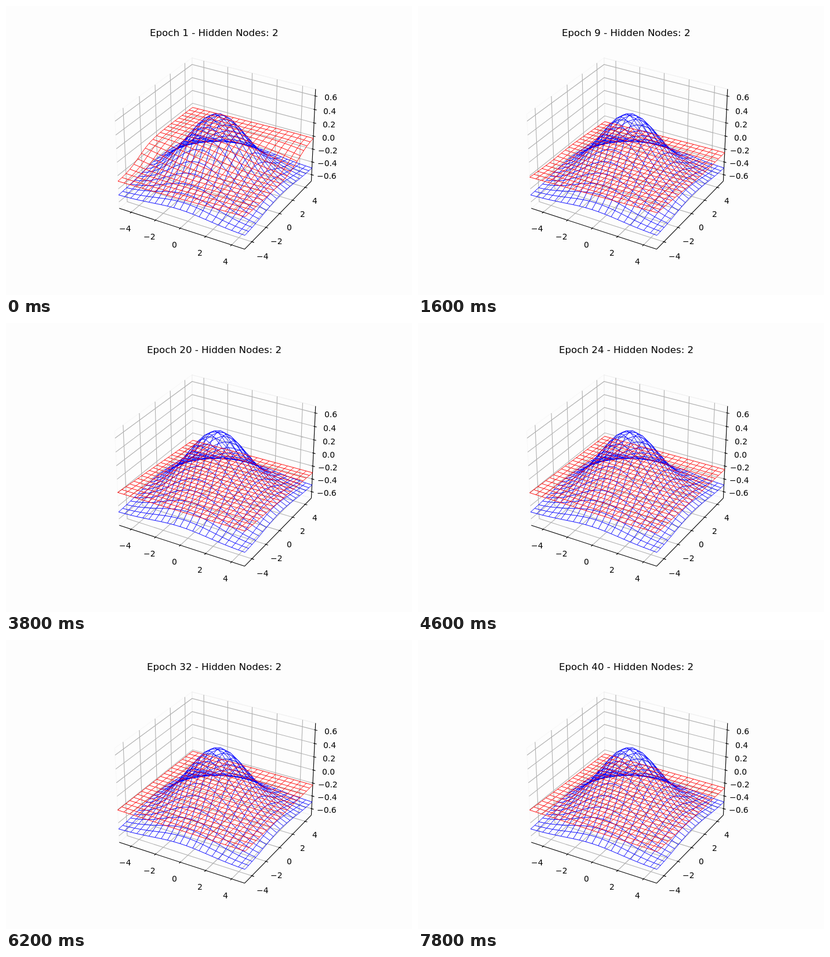
Recreate the animation shown at these times as an HTML page. Size 700 by 500 pixels, loop 8 s.

```html
<!DOCTYPE html>
<html lang="en">
<head>
<meta charset="utf-8">
<title>Surface fit</title>
<style>
  html, body { margin: 0; width: 100%; height: 100%; overflow: hidden; background: #fdfdfd; }
  svg { display: block; width: 700px; height: 500px; }
  path { fill: none; }
  text { font: 13.89px "DejaVu Sans", sans-serif; fill: #000; }
  #title { font-size: 16.67px; }
</style>
</head>
<body>
<svg id="stage" viewBox="0 0 700 500"><text id="title" y="52"></text></svg>
<script>
const stage = document.getElementById('stage');
const title = document.getElementById('title');
const EPOCH_MS = 200, EPOCHS = 40;

// Half sizes of the plot box in world units, and in data units.
const HX = 25 / 42, HZ = 25 / 56, XLIM = 5, ZLIM = 0.7;
const DX = HX * 0.16, DZ = HZ * 0.16;
const WIRE = 0.95;

// Perspective camera: elevation 30, azimuth -60, distance 10.
function project(x, y, z) {
  const r = Math.sqrt(3) / 2;
  const depth = 10 - (r / 2 * x - 0.75 * y + 0.5 * z);
  const scale = 385 / 0.185 / depth;
  return [363.95 + scale * (r * x + 0.5 * y),
          247.3 - scale * (-0.25 * x + r / 2 * y + r * z)];
}
const world = (x, y, z) => [x * HX / XLIM, y * HX / XLIM, z * HZ / ZLIM];
const line = points =>
  'M' + points.map(p => project(...p).map(v => v.toFixed(2)).join(' ')).join('L');

function add(tag, attrs, content = '') {
  const el = document.createElementNS('http://www.w3.org/2000/svg', tag);
  for (const key in attrs) el.setAttribute(key, attrs[key]);
  el.textContent = content;
  stage.append(el);
  return el;
}
const stroke = (d, color, width) => add('path', { d, stroke: color, 'stroke-width': width });

// Centre text on x, starting on a whole pixel.
function centre(text, x) {
  text.setAttribute('x', Math.round(x - text.getComputedTextLength() / 2));
}

function label(value, digits, position) {
  const [x, y] = project(...position);
  centre(add('text', { y: Math.round(y + 11) },
             value.toFixed(digits).replace('-', '\u2212')), x);
}

function drawAxes() {
  const pane = (points, color) => stroke(line(points) + 'Z', color, 1.39);
  pane([[-HX, -HX, -HZ], [-HX, HX, -HZ], [-HX, HX, HZ], [-HX, -HX, HZ]], '#f8f8f8');
  pane([[-HX, HX, -HZ], [HX, HX, -HZ], [HX, HX, HZ], [-HX, HX, HZ]], '#f1f1f1');
  pane([[-HX, -HX, -HZ], [HX, -HX, -HZ], [HX, HX, -HZ], [-HX, HX, -HZ]], '#f5f5f5');

  let grid = '', ticks = '';
  const padX = HX + DX * 0.9957, padZ = HZ + DZ * 0.9957;
  const out = HX + DX * 0.2, inn = HX - DX * 0.1;
  for (let v = -4; v <= 4; v += 2) {
    const w = v * HX / XLIM;
    grid += line([[w, -HX, -HZ], [w, HX, -HZ], [w, HX, HZ]]);
    grid += line([[HX, w, -HZ], [-HX, w, -HZ], [-HX, w, HZ]]);
    ticks += line([[w, -out, -HZ], [w, -inn, -HZ]]);
    ticks += line([[out, w, -HZ], [inn, w, -HZ]]);
    label(v, 0, [w, -padX, -padZ]);
    label(v, 0, [padX, w, -padZ]);
  }
  for (let i = -3; i <= 3; i++) {
    const w = i * 0.2 * HZ / ZLIM;
    grid += line([[-HX, -HX, w], [-HX, HX, w], [HX, HX, w]]);
    ticks += line([[out, HX, w], [inn, HX, w]]);
    label(i * 0.2, 1, [padX, padX, w]);
  }
  stroke(grid, '#b0b0b0', 1.11);
  const edges = line([[-HX, -HX, -HZ], [HX, -HX, -HZ]]) +
                line([[HX, -HX, -HZ], [HX, HX, -HZ]]) +
                line([[HX, HX, -HZ], [HX, HX, HZ]]);
  stroke(edges + ticks, '#000', 1.11);
}

const steps = Array.from({ length: 21 }, (_, i) => -5 + i / 2);
function wireframe(height) {
  return steps.map(a =>
    line(steps.map(b => world(b, a, height(b, a)))) +
    line(steps.map(b => world(a, b, height(a, b))))).join('');
}

// Fitted surface: epoch, heights at left, front, back and right corners,
// then the size and offset of the sigmoid bend.
const KEYS = [
  [1, -0.283, -0.219, -0.066, -0.035, 0.26, 0.2],
  [5, -0.256, -0.190, -0.181, -0.141, 0.12, 1.2],
  [13, -0.196, -0.144, -0.371, -0.342, 0.01, 1.2],
  [20, -0.197, -0.181, -0.319, -0.302, 0, 1.2],
  [24, -0.202, -0.211, -0.255, -0.253, 0, 1.2],
  [32, -0.206, -0.226, -0.222, -0.230, 0, 1.2],
  [40, -0.206, -0.232, -0.264, -0.275, 0, 1.2]
];

// Cubic Hermite interpolation through the keys.
function stateAt(epoch) {
  const last = KEYS.length - 1;
  let i = 0;
  while (i < last - 1 && epoch > KEYS[i + 1][0]) i++;
  const a = KEYS[i], b = KEYS[i + 1], span = b[0] - a[0];
  const u = (epoch - a[0]) / span;
  const slope = (k, c) => {
    const p = KEYS[Math.max(k - 1, 0)], q = KEYS[Math.min(k + 1, last)];
    return (q[c] - p[c]) / (q[0] - p[0]);
  };
  return [1, 2, 3, 4, 5, 6].map(c =>
    a[c] * (1 + 2 * u) * (1 - u) ** 2 + b[c] * u * u * (3 - 2 * u) +
    span * u * (1 - u) * (slope(i, c) * (1 - u) - slope(i + 1, c) * u));
}

const bilinear = (x, y, [left, front, back, right]) => {
  const u = (x + 5) / 10, v = (y + 5) / 10;
  return (left * (1 - u) + front * u) * (1 - v) + (back * (1 - u) + right * u) * v;
};

function fitted(epoch) {
  const [left, front, back, right, bend, offset] = stateAt(epoch);
  const corners = [left, front, back, right];
  const sigmoid = (x, y) => 1 / (1 + Math.exp(-1.2 * (y - offset - 0.5 * x)));
  const ends = [sigmoid(-5, -5), sigmoid(5, -5), sigmoid(-5, 5), sigmoid(5, 5)];
  return (x, y) =>
    bilinear(x, y, corners) + bend * (sigmoid(x, y) - bilinear(x, y, ends));
}

drawAxes();
stroke(wireframe((x, y) => Math.exp(-(x * x + y * y) / 10) - 0.5), '#00f', WIRE);
const fit = stroke('', '#f00', WIRE);

let shown = 0;
function render(now) {
  const epoch = Math.floor(now / EPOCH_MS) % EPOCHS + 1;
  if (epoch !== shown) {
    shown = epoch;
    title.textContent = `Epoch ${epoch} - Hidden Nodes: 2`;
    centre(title, 358.75);
    fit.setAttribute('d', wireframe(fitted(epoch)));
  }
}
const start = performance.now();
function frame() {
  render(performance.now() - start);
  requestAnimationFrame(frame);
}
frame();
</script>
</body>
</html>
```
